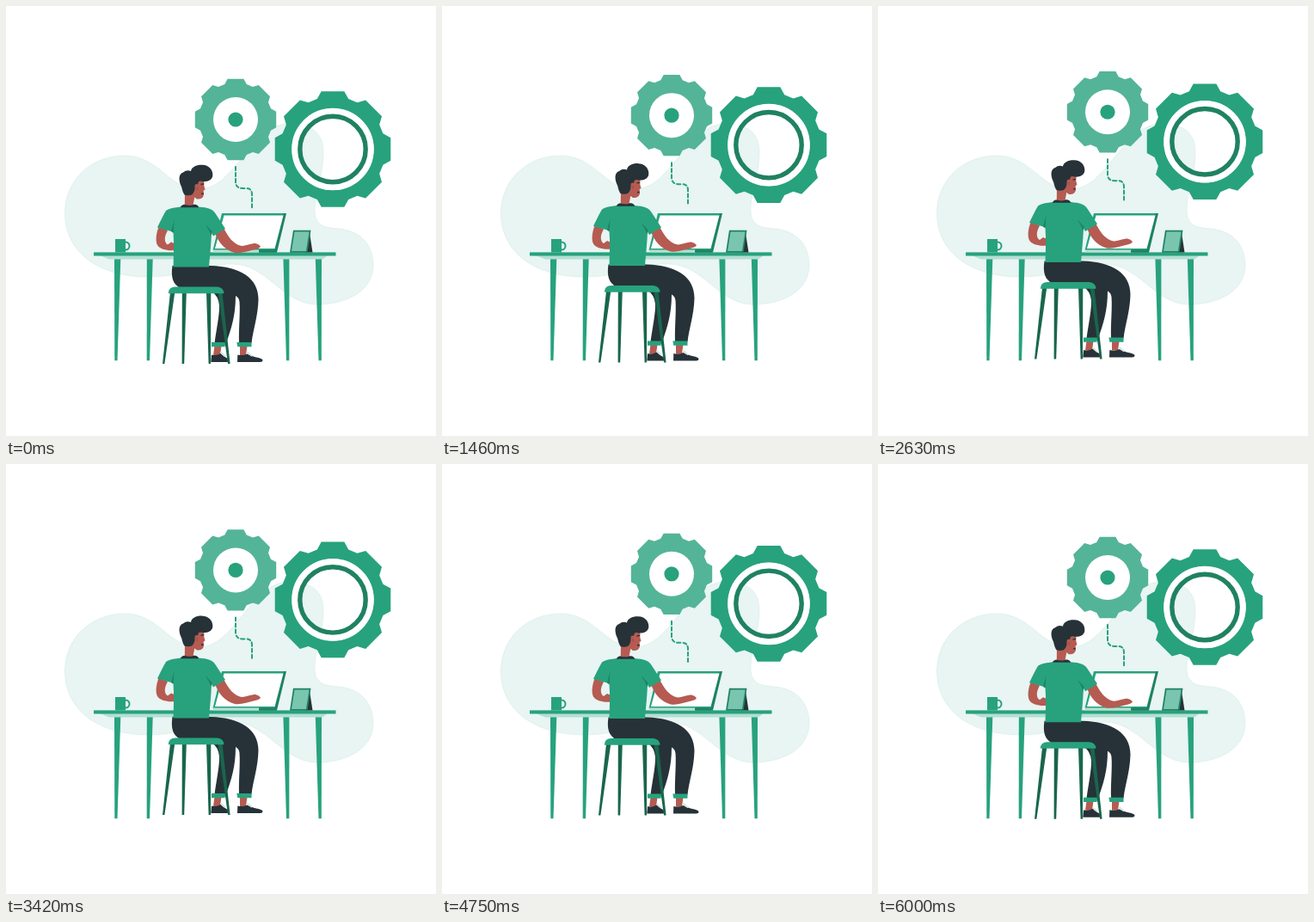
Recreate the animation shown at these times as an HTML page. Size 500 by 500 pixels, loop 6.04 s.

```html
<!DOCTYPE html>
<html lang="en">
<head>
<meta charset="utf-8">
<title>Working at a desk</title>
<style>
  html, body { margin: 0; width: 100%; height: 100%; overflow: hidden; background: #fff; }
  svg { display: block; width: 100vw; height: 100vh; }
  .green { fill: #27a27d; }
  .deep { fill: #1f8262; }
  .forest { fill: #19664d; }
  .pale { fill: #b4dfd2; }
  .soft { fill: #54b498; }
  .white { fill: #fff; }
  .ink { fill: #263238; }
  .skin { fill: #b55b52; }
  .line { fill: none; stroke: #27a27d; stroke-width: 2; }
</style>
</head>
<body>
<svg viewBox="0 0 500 500" xmlns="http://www.w3.org/2000/svg">
  <path fill="#e8f5f2" stroke="#cfe9e2" stroke-width=".5" d="M68.500 240 C69 203 98 174 138 174 C178 174 189 213 224 213
    C267 213 284 137 329 137 C356 137 369 148 369 170 C369 198 359 213 359 238 C359 256 372 258 387 259
    C411 261 427 277 427 301 C427 331 397 347 362 347 C321 347 304 300 263 300 C229 300 209 315 165 315
    C109 315 68 287 68.500 240Z"/>

  <g id="gears">
    <path id="smallGear" class="soft"/>
    <circle class="white" cx="267" cy="132" r="26"/>
    <circle class="green" cx="267" cy="132" r="8.600"/>
    <path id="bigGear" class="green" fill-rule="evenodd"/>
    <circle cx="380" cy="166.500" r="44.300" fill="none" stroke="#fff" stroke-width="7"/>
    <circle cx="380" cy="166.500" r="38.200" fill="none" stroke="#1f8262" stroke-width="5.400"/>
    <path class="line" stroke-dasharray="4 3" stroke-linecap="round" stroke-width="1.800"
      d="M267 187 V204 Q267 212 275 212 H279 Q286 212 286 219 V236"/>
  </g>

  <g id="desk">
    <g class="green">
      <path d="M126 294H133.300L129.500 412.300H126.300Z"/>
      <path d="M163.800 294H170.700L167 412.300H163.700Z"/>
      <path d="M322.400 294H329.400L329.300 412.300H326Z"/>
      <path d="M359.800 294H367L366.800 412.300H363.500Z"/>
    </g>
    <path class="pale" d="M109 290H374L368 294.400H120Z"/>
    <rect class="green" x="102" y="286.400" width="281.500" height="4.100"/>
    <path class="green" d="M127 271H139V286.500H127Z"/>
    <circle class="line" cx="139" cy="279" r="4.500" stroke-width="1.800"/>
    <path class="deep" d="M251 241H326L315 286.500H294V283H312Z"/>
    <path class="green" d="M251 241H323L312.500 284H240.500Z"/>
    <path class="white" d="M253.500 243.500H322.500L312.500 282H243Z"/>
    <path class="pale" d="M241 283.600H295V286.500H241Z"/>
    <path class="deep" d="M294 283.600H315L314.500 286.500H294Z"/>
    <path class="ink" d="M353 264L356.500 286.500H348Z"/>
    <path class="deep" d="M334 260.700H354.500L350.500 286.800H330Z"/>
    <path fill="#7ac5ae" d="M335.500 262.600H352.500L349 285H332Z"/>
  </g>

  <g id="worker">
    <path class="skin" d="M242.500 395H250.500L249 406H241Z M272 395H280.500L279 406H272Z"/>
    <path class="ink" d="M238.300 414L239 405.500Q245 407 249.500 404C253 408 258.500 409 259.300 412.500Q259 414 257 414Z
      M269 414L269.300 405.500Q276 407 280.500 404.500C286 408.500 297 408.500 298.500 411.500Q298.500 414 295.500 414Z"/>
    <path d="M249.500 402.500L255 407.500M280.500 402.500L286 407" stroke="#d3e4e0" stroke-width="1.800" fill="none"/>
    <path class="ink" d="M193.500 302H238C272 303 293.500 316 293.500 341C293 361 287.500 375 285.500 392H271
      C270.500 374 272.500 357 271.500 344Q271 339 267 337C267 360 262 375 256 392H242.500
      C245 374 248.500 358 248 348Q247 337 239 332L203 328C194 324 191.500 315 193.500 302Z"/>
    <path class="green" d="M239 391H255.500L254.500 396.300H239Z M268.300 391H285.500V396.300H269.300Z"/>
    <path class="forest" d="M191 333H196.300L184.400 416H182Z M204.800 333H209.800L207.200 416H204.600Z
      M233 333H238.300L238 416H235.600Z M246.500 333H251.500L260.600 416H258Z"/>
    <path class="green" d="M188.800 334.200Q189 326.500 197 326.500H245.500Q253 327 253.500 334.200Z"/>

    <path class="skin" d="M178 256C174.500 264 173.500 273 176 278C179 283 188 285 196.500 284V276.500
      L192 274.500L188 277.500C184 275 183.500 269 188 261Z"/>
    <path class="skin" d="M243 264L252.500 257C258 268 264 277 274 279C281 278.500 285 276 290 276
      Q294 276.500 296 279.500Q295 282 289 283.300C281 285 274 288 266 287C254 284 247 274 243 264Z"/>
    <path class="green" d="M204 233.500H224C235 234.500 240 235.500 244 242L255 259L241 267.500L239 264
      C238.500 278 237 291 236 303.500H194.500C195 290 195.500 277 194.500 263L192 262L176 257.500
      C179 251 182 245 186 238C190 235 196 234.500 204 233.500Z"/>
    <path class="deep" d="M231.500 253.500L239.500 262L238.800 267Q236 260 231.500 253.500Z M195.500 249L194.500 264L192 262Z"/>
    <path class="ink" d="M202.800 234.200Q204 231 208 230.800H220Q223.500 231.500 224.200 234.200Z"/>
    <path class="skin" d="M208 215H219V224L217.500 231.300Q212 232.500 207.800 231Z
      M217 204Q223 200 230.500 203L230.300 209L231.500 213.500L229.700 214.500L230 219.500
      Q229 225 222 224.500L216 220Z"/>
    <path class="ink" d="M207.500 219.500C204.500 215 205 211 203 208C200.500 201 201 195 206 193.500
      Q210 190 215 192C215.500 187 222 184.300 228.500 184.700C235.500 185 241 190 240.300 197.500
      C239 204 232 205 226 203.500Q223.500 203.300 223 207.500Q219.500 206 219.500 210
      Q220 216 216 219.500Q211 221 207.500 219.500Z"/>
    <path d="M226.500 207.500L230 206.800M227 218.300L229.800 218" stroke="#263238" stroke-width="1.300" fill="none"/>
    <path d="M221 210Q223.500 211 222 214" stroke="#8f4641" stroke-width=".8" fill="none"/>
  </g>
</svg>
<script>
  const LOOP = 6040, PERIOD = 6000, RISE = 10, WORKER_DELAY = 1000;
  const byId = id => document.getElementById(id);

  function gearPath(cx, cy, size) {
    const tip = size * 1.024, base = size * 0.913;
    const profile = [[-17.3, base], [-11.2, tip], [11.2, tip], [17.3, base]];
    const points = [];
    for (let tooth = 0; tooth < 8; tooth++) {
      for (const [angle, r] of profile) {
        const a = (tooth * 45 + angle) * Math.PI / 180;
        points.push((cx + r * Math.sin(a)).toFixed(2) + ' ' + (cy - r * Math.cos(a)).toFixed(2));
      }
    }
    return 'M' + points.join('L') + 'Z';
  }

  const circlePath = (cx, cy, r) =>
    `M${cx - r} ${cy}a${r} ${r} 0 1 0 ${2 * r} 0a${r} ${r} 0 1 0 ${-2 * r} 0Z`;

  byId('smallGear').setAttribute('d', gearPath(267, 132, 47));
  byId('bigGear').setAttribute('d', gearPath(380, 166.5, 67) + circlePath(380, 166.5, 47.5));

  // Linear rise and fall; stays at rest until its start time.
  function lift(time) {
    const phase = (Math.max(0, time) % PERIOD) / PERIOD;
    return -RISE * (1 - Math.abs(1 - 2 * phase));
  }

  const gears = byId('gears'), worker = byId('worker');
  const start = performance.now();

  function draw(now) {
    const time = Math.max(0, now - start) % LOOP;
    gears.setAttribute('transform', `translate(0 ${lift(time).toFixed(3)})`);
    worker.setAttribute('transform', `translate(0 ${lift(time - WORKER_DELAY).toFixed(3)})`);
    requestAnimationFrame(draw);
  }
  draw(start);
</script>
</body>
</html>
```
